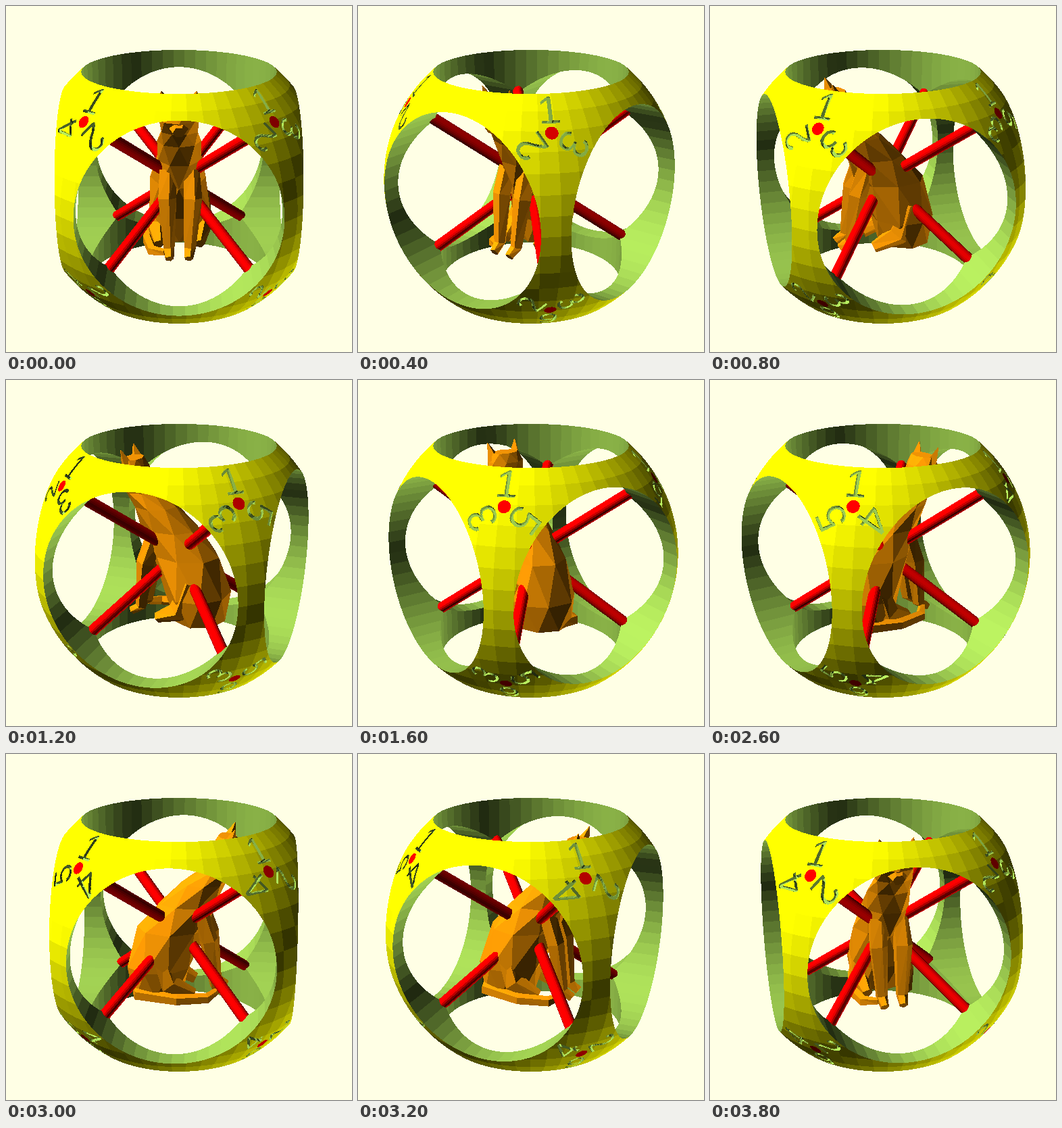
These frames come from a looping animation (512 px wide and 512 px high, 4 s). An HTML page with a canvas:

```html
<!DOCTYPE html>
<html lang="en">
<head>
<meta charset="utf-8">
<title>Hollow die with a cat</title>
<style>
html, body { margin: 0; width: 100%; height: 100%; overflow: hidden; background: #ffffe5; }
canvas { display: block; width: 100vw; height: 100vh; }
</style>
</head>
<body>
<canvas id="stage" width="512" height="512"></canvas>
<script>
// Object space: x right, y towards the viewer, z up; the die is close to a unit sphere.
const SIZE = 512, HALF = 256, FOCAL = 1287, DIST = 5.988, TILT = Math.PI / 9;
const BALL = 0.9985, HOLE = 0.64, ROD = 0.039;
const FACET = Math.PI / 25, STEPS = 20, STEP_MS = 200;
const YELLOW = [255, 255, 0], GREEN = [157, 203, 81], RED = [255, 0, 0], ORANGE = [255, 156, 5];

const dot = (a, b) => a[0] * b[0] + a[1] * b[1] + a[2] * b[2];
const add = (a, b, k = 1) => [a[0] + b[0] * k, a[1] + b[1] * k, a[2] + b[2] * k];
const cross = (a, b) => [a[1] * b[2] - a[2] * b[1], a[2] * b[0] - a[0] * b[2], a[0] * b[1] - a[1] * b[0]];
const unit = a => { const k = 1 / Math.hypot(...a); return [a[0] * k, a[1] * k, a[2] * k]; };

let seed = 11;
const random = () => (seed = seed * 16807 % 2147483647) / 2147483647;

// ---- Triangle meshes: rods and cat ----
const triangles = [];

function ring(center, a, b, n, twist, jitter) {
  return Array.from({ length: n }, (_, i) => {
    const t = (i + twist) / n * 2 * Math.PI;
    const k = 1 + (random() - 0.5) * jitter;
    return add(add(center, a, Math.cos(t) * k), b, Math.sin(t) * k);
  });
}

function loft(rings, color) {
  const n = rings[0].length;
  const face = (a, b, c) => triangles.push({ pts: [a, b, c], normal: unit(cross(add(b, a, -1), add(c, a, -1))), color });
  for (let r = 1; r < rings.length; r++) {
    const lo = rings[r - 1], hi = rings[r];
    for (let i = 0; i < n; i++) {
      const j = (i + 1) % n;
      face(lo[i], lo[j], hi[i]);
      face(lo[j], hi[j], hi[i]);
    }
  }
  for (const end of [rings[0], rings[rings.length - 1]])
    for (let i = 2; i < n; i++) face(end[0], end[i - 1], end[i]);
}

// path entries: x, y, z, radius
function tube(path, n, color, jitter = 0) {
  loft(path.map((p, i) => {
    const dir = unit(add(path[Math.min(i + 1, path.length - 1)], path[Math.max(i - 1, 0)], -1));
    const a = unit(cross(dir, Math.abs(dir[2]) > 0.8 ? [0, 1, 0] : [0, 0, 1]));
    const b = cross(dir, a), r = p[3];
    return ring(p, a.map(v => v * r), b.map(v => v * r), n, 0, jitter);
  }), color);
}

for (let i = 0; i < 8; i++) {
  const c = [i & 1, i & 2, i & 4].map(v => (v ? 1 : -1) * 0.95 / Math.sqrt(3));
  tube([[0, 0, 0, ROD], [...c, ROD]], 20, RED);
}

// Torso and head: height, centre depth, half width, half depth
const torso = [
  [-0.46, -0.15, 0.19, 0.19], [-0.27, -0.14, 0.235, 0.22], [0, -0.05, 0.195, 0.24],
  [0.18, 0.06, 0.16, 0.2], [0.33, 0.17, 0.14, 0.15], [0.43, 0.27, 0.125, 0.11],
  [0.52, 0.32, 0.13, 0.12], [0.59, 0.32, 0.125, 0.1], [0.65, 0.32, 0.1, 0.06]
];
loft(torso.map(([z, y, w, d], i) => ring([0, y, z], [w, 0, 0], [0, d, 0], 8, i * 0.5, 0.1)), ORANGE);
tube([[0, 0.35, 0.5, 0.085], [0, 0.44, 0.465, 0.04]], 6, ORANGE);
for (const s of [-1, 1]) {
  tube([[s * 0.085, 0.33, 0.6, 0.05], [s * 0.11, 0.37, 0.715, 0.004]], 4, ORANGE);
  tube([[s * 0.08, 0.15, 0.12, 0.06], [s * 0.085, 0.21, -0.06, 0.065], [s * 0.068, 0.26, -0.4, 0.042],
    [s * 0.065, 0.33, -0.45, 0.032]], 5, ORANGE, 0.2);
  tube([[s * 0.15, -0.13, -0.14, 0.06], [s * 0.16, -0.06, -0.36, 0.08], [s * 0.14, 0.11, -0.44, 0.04]], 5, ORANGE, 0.2);
}
tube([[0, -0.3, -0.42, 0.045], [-0.16, -0.27, -0.44, 0.05], [-0.22, 0, -0.45, 0.042],
  [-0.18, 0.2, -0.45, 0.038], [-0.09, 0.27, -0.43, 0.025]], 5, ORANGE, 0.2);

// ---- Engraved numbers ----
const EM = 0.25, CELL = 96, BASE = 0.058, FLOOR = 0.957;
const FACES = [[4, 3], [5, 2], [6, 1]];   // per axis: negative side, positive side
const sheet = document.createElement('canvas');
sheet.width = CELL * 6;
sheet.height = CELL;
const pen = sheet.getContext('2d');
pen.font = `${CELL}px "Liberation Sans", Arial, sans-serif`;
pen.textAlign = 'center';
for (let n = 1; n <= 6; n++) pen.fillText(n, (n - 0.5) * CELL, 90);
const ink = pen.getImageData(0, 0, CELL * 6, CELL).data;

function inked(n, u, v) {
  const x = Math.round(CELL / 2 + u * CELL / EM), y = Math.round(90 - (v - BASE) * CELL / EM);
  return x >= 0 && x < CELL && y >= 0 && y < CELL && ink[(y * CELL * 6 + (n - 1) * CELL + x) * 4 + 3] > 127;
}

// Number or rod end near a corner; null where the surface is plain
function cornerMark(p, dir) {
  const c = p.map(v => (v < 0 ? -1 : 1) / Math.sqrt(3));
  const h = dot(p, c);
  if (h < FLOOR) return null;
  if (BALL * BALL - h * h < ROD * ROD) return { normal: c, color: RED };
  const abs = p.map(Math.abs);
  const axis = abs.indexOf(Math.max(...abs)), side = p[axis] > 0 ? 1 : 0;
  const face = [0, 0, 0];
  face[axis] = side ? 1 : -1;
  const up = unit(add(face, c, -1 / Math.sqrt(3))), right = cross(c, up);
  const n = FACES[axis][side];
  if (!inked(n, dot(p, right), dot(p, up))) return null;
  for (let k = 1; k < 60; k++) {
    const q = add(p, dir, k * 0.003), u = dot(q, right), v = dot(q, up);
    if (dot(q, c) < FLOOR) break;
    if (inked(n, u, v)) continue;
    let normal = [0, 0, 0];
    for (let i = 0; i < 8; i++) {
      const x = Math.cos(i * Math.PI / 4), y = Math.sin(i * Math.PI / 4);
      if (inked(n, u + x * 0.008, v + y * 0.008)) normal = add(add(normal, right, x), up, y);
    }
    return { normal: dot(normal, normal) ? unit(normal) : up, color: GREEN };
  }
  return { normal: c, color: GREEN };
}

// ---- Shell: sphere minus three cylinders ----
const centred = a => (Math.floor(a / FACET) + 0.5) * FACET;
const nearest = a => Math.round(a / FACET) * FACET;

function sphereNormal(p) {
  const lat = nearest(Math.acos(Math.max(-1, Math.min(1, p[2] / BALL)))), lon = centred(Math.atan2(p[1], p[0]));
  return [Math.sin(lat) * Math.cos(lon), Math.sin(lat) * Math.sin(lon), Math.cos(lat)];
}

function holeNormal(p, axis) {
  const i = (axis + 1) % 3, j = (axis + 2) % 3;
  const a = (axis === 2 ? centred : nearest)(Math.atan2(p[j], p[i]));
  const n = [0, 0, 0];
  n[i] = Math.cos(a);
  n[j] = Math.sin(a);
  return n;
}

const enter = [0, 0, 0], leave = [0, 0, 0];
function hitShell(o, d) {
  const a = dot(d, d), b = dot(o, d), disc = b * b - a * (dot(o, o) - BALL * BALL);
  if (disc < 0) return null;
  const root = Math.sqrt(disc), end = (-b + root) / a;
  let t = (-b - root) / a, hole = -1;
  for (let i = 0; i < 3; i++) {
    const ca = a - d[i] * d[i], cb = b - o[i] * d[i];
    const cd = cb * cb - ca * (dot(o, o) - o[i] * o[i] - HOLE * HOLE);
    const cr = Math.sqrt(Math.max(cd, 0));
    enter[i] = cd > 0 ? (-cb - cr) / ca : Infinity;
    leave[i] = cd > 0 ? (-cb + cr) / ca : -Infinity;
  }
  for (let i = 0, clear = 0; clear < 3; i = (i + 1) % 3) {
    if (enter[i] <= t && t < leave[i]) {
      t = leave[i];
      hole = i;
      clear = 0;
    } else clear++;
  }
  if (t >= end) return null;
  const p = add(o, d, t);
  if (hole >= 0) return { t, normal: holeNormal(p, hole), color: GREEN };
  const mark = cornerMark(p, d);
  return mark ? { t, ...mark } : { t, normal: sphereNormal(p), color: YELLOW };
}

// ---- Rendering ----
const ctx = document.getElementById('stage').getContext('2d');

function render(step) {
  const turn = -step * 365 / STEPS * Math.PI / 180;
  const c = Math.cos(turn), s = Math.sin(turn), ce = Math.cos(TILT), se = Math.sin(TILT);
  const X = [c, s, 0], Y = [s * se, -c * se, ce], Z = [-s * ce, c * ce, se];
  const light = unit(add(add(Y, Z), X, -1));
  const eye = Z.map(v => v * DIST);
  const image = ctx.createImageData(SIZE, SIZE), data = image.data;
  const near = new Float32Array(SIZE * SIZE);   // 1 / depth

  const shade = (color, normal) => {
    const k = 0.2 + Math.abs(dot(normal, light));
    return color.map(v => Math.min(255, v * k));
  };
  const plot = (i, rgb) => {
    data[i * 4] = rgb[0];
    data[i * 4 + 1] = rgb[1];
    data[i * 4 + 2] = rgb[2];
    data[i * 4 + 3] = 255;
  };

  for (let y = 0; y < SIZE; y++) {
    for (let x = 0; x < SIZE; x++) {
      const i = y * SIZE + x, px = x + 0.5 - HALF, py = HALF - y - 0.5;
      const dir = add(add([-Z[0], -Z[1], -Z[2]], X, px / FOCAL), Y, py / FOCAL);
      const hit = px * px + py * py < 50000 ? hitShell(eye, dir) : null;
      plot(i, hit ? shade(hit.color, hit.normal) : [255, 255, 229]);
      if (hit) near[i] = 1 / hit.t;
    }
  }

  for (const { pts, normal, color } of triangles) {
    const rgb = shade(color, normal);
    const [A, B, C] = pts.map(p => {
      const w = 1 / (DIST - dot(p, Z));
      return [HALF + dot(p, X) * FOCAL * w, HALF - dot(p, Y) * FOCAL * w, w];
    });
    const area = (B[0] - A[0]) * (C[1] - A[1]) - (C[0] - A[0]) * (B[1] - A[1]);
    if (!area) continue;
    const xs = [A[0], B[0], C[0]], ys = [A[1], B[1], C[1]];
    for (let y = Math.floor(Math.min(...ys)); y <= Math.max(...ys); y++) {
      for (let x = Math.floor(Math.min(...xs)); x <= Math.max(...xs); x++) {
        const dx = x + 0.5 - A[0], dy = y + 0.5 - A[1];
        const v = (dx * (C[1] - A[1]) - (C[0] - A[0]) * dy) / area;
        const w = ((B[0] - A[0]) * dy - dx * (B[1] - A[1])) / area;
        if (v < 0 || w < 0 || v + w > 1) continue;
        const i = y * SIZE + x, depth = A[2] + v * (B[2] - A[2]) + w * (C[2] - A[2]);
        if (depth <= near[i]) continue;
        near[i] = depth;
        plot(i, rgb);
      }
    }
  }
  return image;
}

const cache = [], start = performance.now();
let shown = -1;
function tick() {
  const step = Math.floor((performance.now() - start) / STEP_MS) % STEPS;
  if (step !== shown) {
    cache[step] = cache[step] || render(step);
    ctx.putImageData(cache[step], 0, 0);
    shown = step;
  }
  requestAnimationFrame(tick);
}
tick();
</script>
</body>
</html>
```
